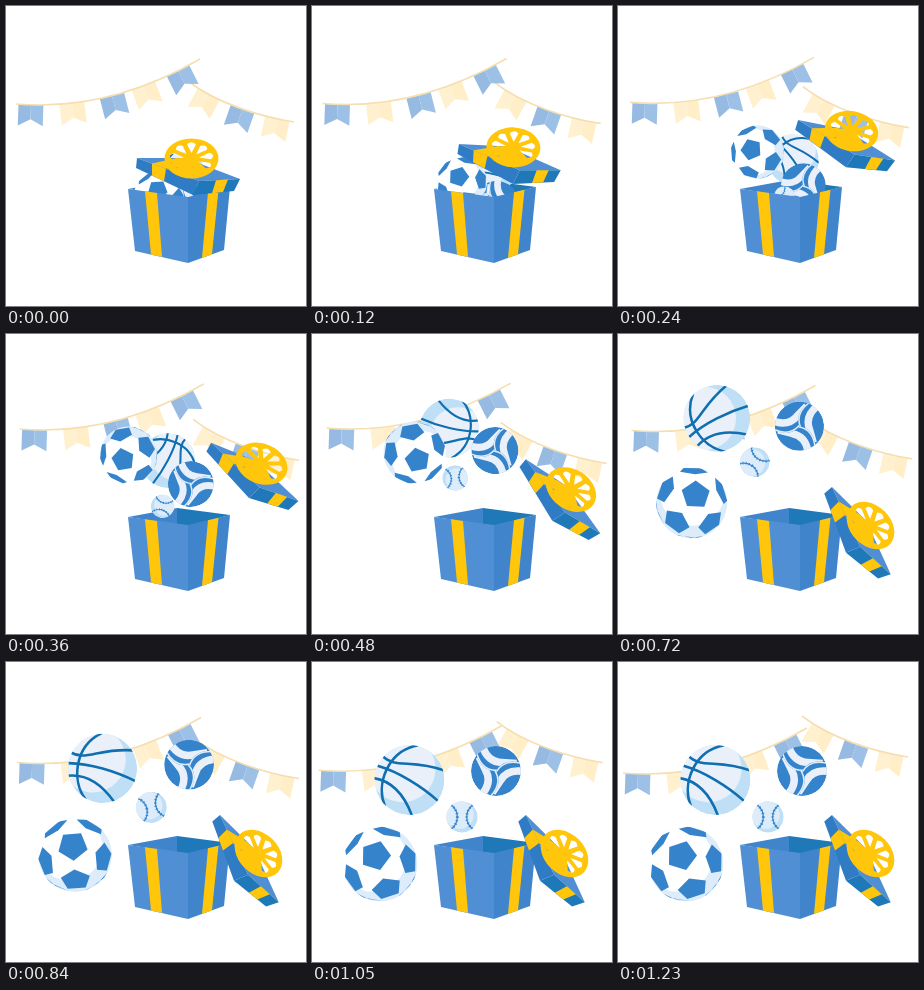
An HTML page with a canvas for the animation above (1350 ms loop, 300 px wide and 300 px high).

```html
<!DOCTYPE html>
<html lang="en">
<head>
<meta charset="utf-8">
<title>Gift box</title>
<style>
html, body { margin: 0; width: 100%; height: 100%; overflow: hidden; background: #fff; }
canvas { display: block; width: 100vw; height: 100vh; }
</style>
</head>
<body>
<canvas id="stage" width="300" height="300"></canvas>
<script>
const ctx = document.getElementById('stage').getContext('2d');
const LOOP = 1350, STEP = 30, LAST = 1230, TAU = Math.PI * 2;
const C = {
  face: '#508fd3', side: '#4085cc', front: '#2f7cc4', dark: '#1f78b8', yellow: '#ffc60b',
  pale: '#dcecfa', sky: '#bfdff6', soft: '#e9f0fa', blue: '#3583cb', line: '#0f6fb0',
  flags: [['#96bae2', '#9dc0e6'], ['#fff0cf', '#ffeec8']], string: '#f5dfb0'
};

const rad = d => d * Math.PI / 180;
const mix = (a, b, u) => a + (b - a) * u;
const ease = u => Math.sin(Math.min(1, Math.max(0, u)) * Math.PI / 2) ** 2;
const shift = (pts, [dx, dy]) => pts.map(([x, y]) => [x + dx, y + dy]);

// Point on a Bezier curve, by repeated mixing; the last pair gives the tangent.
function bezier(pts, u) {
  let angle = 0;
  while (pts.length > 1) {
    if (pts.length === 2) angle = Math.atan2(pts[1][1] - pts[0][1], pts[1][0] - pts[0][0]);
    pts = pts.slice(1).map((q, i) => [mix(pts[i][0], q[0], u), mix(pts[i][1], q[1], u)]);
  }
  return [...pts[0], angle];
}

function poly(color, ...pts) {
  ctx.fillStyle = color;
  ctx.beginPath();
  pts.forEach(p => ctx.lineTo(p[0], p[1]));
  ctx.closePath();
  ctx.fill();
}
function disc(color, x, y, r) {
  ctx.fillStyle = color;
  ctx.beginPath();
  ctx.arc(x, y, r, 0, TAU);
  ctx.fill();
}
function curve(color, width, p, q, r, s) {
  ctx.strokeStyle = color;
  ctx.lineWidth = width;
  ctx.beginPath();
  ctx.moveTo(...p);
  ctx.bezierCurveTo(...q, ...r, ...s);
  ctx.stroke();
}
function placed(x, y, angle, scale, draw) {
  ctx.save();
  ctx.translate(x, y);
  ctx.rotate(angle);
  ctx.scale(scale, scale);
  draw();
  ctx.restore();
}

// Sways to a peak offset, then drifts on to an end offset.
function sway(t, peak, end) {
  const PEAK_TIME = 550;
  const up = ease(t / PEAK_TIME), on = ease((t - PEAK_TIME) / (LAST - PEAK_TIME));
  return peak.map((p, i) => mix(p * up, end[i], on));
}
function bunting(pts, places, firstColor) {
  places.forEach((u, i) => {
    const [left, right] = C.flags[(i + firstColor) % 2];
    placed(...bezier(pts, u), 1, () => {
      poly(left, [-12.5, 0], [0, 0], [0, 14.5], [-12.5, 21]);
      poly(right, [0, 0], [12.5, 0], [12.5, 21], [0, 14.5]);
    });
  });
  curve(C.string, 1.6, ...pts);
}

function basketball() {
  disc(C.sky, 0, 0, 1);
  disc(C.soft, -.32, -.2, .95);
  curve(C.line, .075, [-.2, -1], [-.9, -.5], [-.85, .5], [-.3, 1]);
  curve(C.line, .075, [-1, .02], [-.4, -.08], [.4, .02], [1, .2]);
  curve(C.line, .075, [-1, -.3], [-.5, -.1], [-.2, -.6], [.9, -.68]);
  curve(C.line, .075, [-1, .4], [-.4, .2], [.1, .5], [.5, .9]);
}

// Three panel groups swirl out from the middle, each with one light band.
function volleyball() {
  const edge = y => ctx.quadraticCurveTo(.5, y - .35, 1.1, y + .15);
  disc(C.blue, 0, 0, 1);
  for (let k = 0; k < 3; k++) {
    ctx.save();
    ctx.rotate(rad(-25 + 120 * k));
    ctx.beginPath();
    ctx.moveTo(0, 0);
    edge(0);
    ctx.arc(0, 0, 1.1, .14, .14 + TAU / 3);
    ctx.rotate(TAU / 3);
    ctx.quadraticCurveTo(.5, -.35, 0, 0);
    ctx.rotate(-TAU / 3);
    ctx.clip();
    [[0, C.pale, .12], [.42, C.soft, .3]].forEach(([y, color, width]) => {
      ctx.strokeStyle = color;
      ctx.lineWidth = width;
      ctx.beginPath();
      ctx.moveTo(-.5, y + .3);
      ctx.lineTo(0, y);
      edge(y);
      ctx.stroke();
    });
    ctx.restore();
  }
}

function baseball() {
  disc(C.sky, 0, 0, 1);
  disc(C.pale, -.15, -.15, .9);
  ctx.strokeStyle = C.blue;
  for (const x of [-1.25, 1.25]) {
    ctx.beginPath();
    ctx.arc(x, 0, .95, 0, TAU);
    ctx.lineWidth = .08;
    ctx.stroke();
    ctx.lineWidth = .18;
    ctx.setLineDash([.06, .15]);
    ctx.stroke();
    ctx.setLineDash([]);
  }
}

// Pentagons sit on the vertices of an icosahedron, one of them near the viewer.
const pentagons = (() => {
  const tilt = rad(16), toward = rad(242), size = rad(24.5);
  const sphere = (th, ph) => [Math.sin(th) * Math.cos(ph), Math.sin(th) * Math.sin(ph), Math.cos(th)];
  const view = ([x, y, z]) => {
    const c = Math.cos(toward), s = Math.sin(toward);
    const a = x * c + y * s, b = y * c - x * s;
    const a2 = a * Math.cos(tilt) + z * Math.sin(tilt);
    return [a2 * c - b * s, a2 * s + b * c, z * Math.cos(tilt) - a * Math.sin(tilt)];
  };
  const patch = (th, ph) => {
    const c = sphere(th, ph), u = sphere(th - Math.PI / 2, ph), v = [-Math.sin(ph), Math.cos(ph), 0];
    return [0, 1, 2, 3, 4].map(k => {
      const a = k * TAU / 5 + (th ? 0 : Math.PI);
      return view(c.map((n, i) => n * Math.cos(size) +
        Math.sin(size) * (u[i] * Math.cos(a) + v[i] * Math.sin(a))));
    });
  };
  const list = [patch(0, 0)];
  for (let k = 0; k < 5; k++) {
    list.push(patch(rad(63.4), k * TAU / 5), patch(rad(116.6), (k + .5) * TAU / 5));
  }
  return list.filter(p => p.some(q => q[2] > 0)).map(p => p.map(([x, y, z]) => {
    const d = z < 0 ? Math.hypot(x, y) : 1;
    return [x / d, y / d];
  }));
})();

function soccer() {
  disc(C.pale, 0, 0, 1);
  disc('#fff', -.2, -.16, .9);
  pentagons.forEach(p => poly(C.blue, ...p));
}

// Each ball flies along one curve while it grows and spins down to rest.
const balls = [
  { draw: basketball, path: [[176, 170], [190, 148], [85, 7], [97.5, 118]], size: [24, 35], spin: -395, rest: 25 },
  { draw: volleyball, path: [[184, 202], [190, 160], [175, 47], [184, 109]], size: [22, 25], spin: -340, rest: 0 },
  { draw: baseball, path: [[170, 196], [170, 205], [105, 62], [150, 155]], size: [10, 15.7], spin: -370, rest: 0 },
  { draw: soccer, path: [[153, 190], [125, 64], [75, 122], [68, 202]], size: [25, 37.5], spin: 375, rest: 0 }
];
function ball({ draw, path, size, spin, rest }, u) {
  const [x, y] = bezier(path, u);
  placed(x, y, rad(rest + spin * (1 - u)), mix(...size, u), () => {
    ctx.beginPath();
    ctx.arc(0, 0, 1, 0, TAU);
    ctx.clip();
    draw();
  });
}

function boxInside() {
  poly(C.side, [122, 183], [171, 174], [171, 190], [182, 192]);
  poly(C.dark, [171, 174], [224, 181], [182, 192], [171, 190]);
}
function boxFront() {
  poly(C.face, [122, 183], [182, 191], [182, 257], [129, 245]);
  poly(C.side, [182, 191], [224, 181], [218, 244], [182, 257]);
  poly(C.yellow, [139, 185.3], [151, 187], [156, 251], [145, 248.6]);
  poly(C.yellow, [202, 186.2], [212.5, 183.8], [206, 248.3], [196, 252]);
}

function bow() {
  const RX = 27, RY = 20;
  const at = (r, deg) => [RX * r * Math.cos(rad(deg)), RY * r * Math.sin(rad(deg))];
  ctx.fillStyle = C.yellow;
  ctx.beginPath();
  ctx.ellipse(0, 0, RX, RY, 0, 0, TAU);
  for (let deg = 150; deg <= 390; deg += 40) {
    ctx.moveTo(...at(.28, deg));
    ctx.lineTo(...at(.72, deg - 13));
    ctx.quadraticCurveTo(...at(.92, deg), ...at(.72, deg + 13));
    ctx.closePath();
  }
  ctx.fill('evenodd');
}
function lid() {
  poly(C.face, [0, 0], [48, 0], [103, 21], [62, 23]);
  poly(C.front, [0, 0], [62, 23], [56, 37], [-1, 10]);
  poly(C.dark, [62, 23], [103, 21], [97, 33], [56, 37]);
  poly(C.yellow, [15, 5.5], [29, 10.7], [27, 23.2], [15, 17.5]);
  poly(C.yellow, [15, 5.5], [29, 10.7], [60, 8], [40, 0]);
  poly(C.yellow, [79, 22.2], [91, 21.6], [86, 34.1], [75, 35.2]);
  placed(54.5, .5, 0, 1, bow);
}

function render(t) {
  ctx.fillStyle = '#fff';
  ctx.fillRect(0, 0, 300, 300);
  bunting(shift([[182, 75], [210, 97], [255, 111], [288, 116]], sway(t, [7, 14], [2, -21])), [.22, .53, .84], 1);
  bunting(shift([[10, 98], [70, 103], [130, 90], [194, 53]], sway(t, [5, -4], [-5, 13])), [.083, .31, .53, .7, .885], 0);
  boxInside();
  balls.forEach(b => ball(b, ease(t / 960)));
  boxFront();
  const open = ease(t / 720);
  const [x, y] = bezier([[131, 152], [216, 75], [216, 113], [214, 153]], open);
  placed(x, y, rad(44.5 * open), 1, lid);
}

function tick() {
  const t = performance.now() % LOOP;
  render(Math.min(LAST, Math.floor(t / STEP) * STEP));
  requestAnimationFrame(tick);
}
tick();
</script>
</body>
</html>
```
